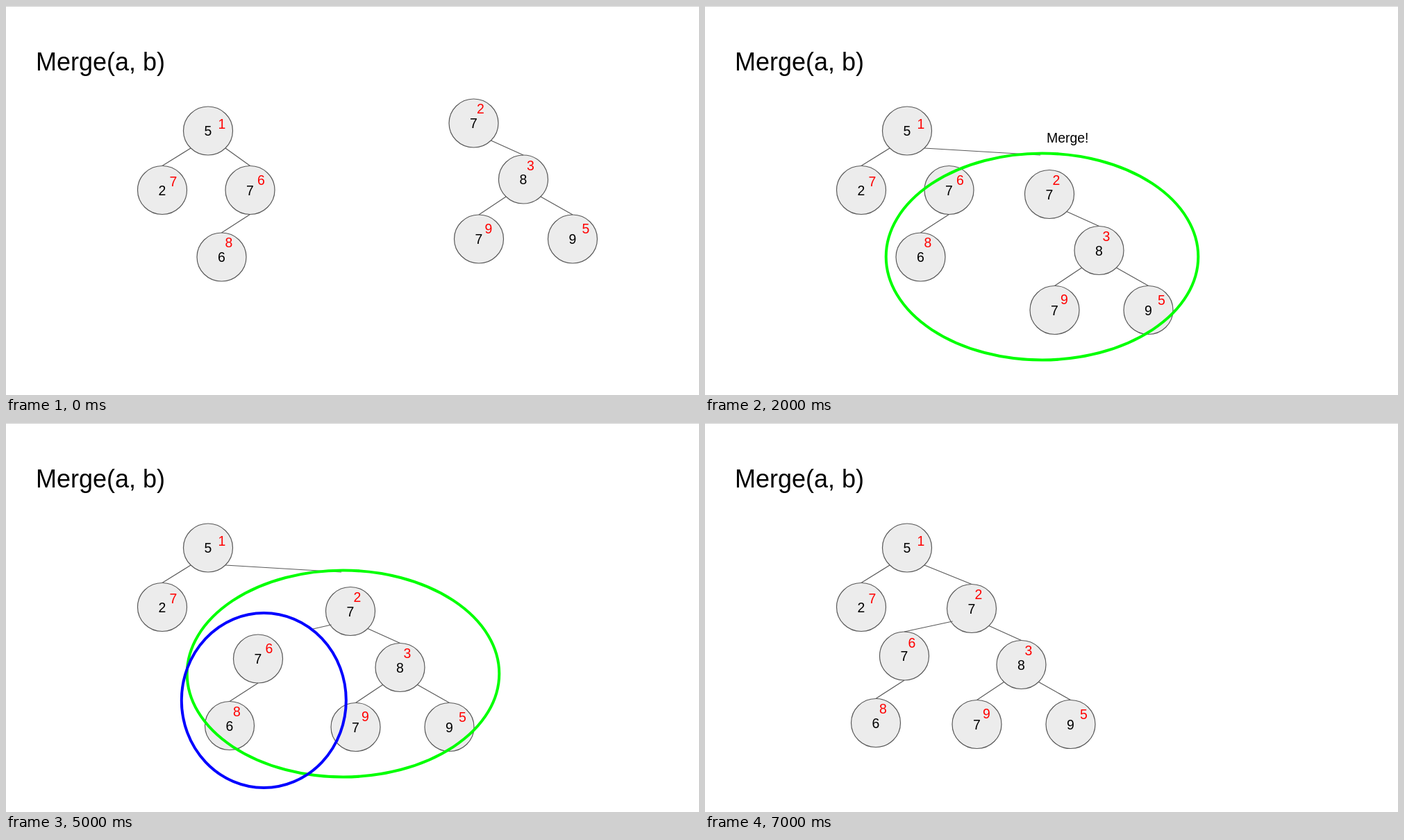
Animation of 998x561 px, one loop 8000 ms. Source, as an HTML page:

```html
<!DOCTYPE html>
<html lang="zh-Hant">
<head>
<meta charset="utf-8">
<title>Merge(a, b)</title>
<style>
html, body { margin: 0; width: 100%; height: 100%; overflow: hidden; background: #fff; }
svg { display: block; width: 100vw; height: 100vh; }
text { font: 19.4px "Liberation Sans", "Noto Sans CJK TC", "Noto Sans CJK", sans-serif; }
.title { font-size: 36px; }
.mid { text-anchor: middle; }
.rank { fill: #f00; }
.node { fill: #ececec; stroke: #595959; stroke-width: 1.2; }
.link { stroke: #595959; stroke-width: 1.2; }
.ring { fill: none; stroke-width: 4; }
</style>
</head>
<body>
<svg viewBox="0 0 998 561">
  <rect width="998" height="1" fill="#d4d4d4"/>
  <text class="title" x="43" y="93">Merge(a, b)</text>
  <g id="scene"></g>
</svg>
<script>
const STEP = 1000;
const RX = 35.5, RY = 35;

const label = (x, y, text, cls = "") => `<text class="${cls}" x="${x}" y="${y}">${text}</text>`;
const link = (x1, y1, x2, y2) => `<line class="link" x1="${x1}" y1="${y1}" x2="${x2}" y2="${y2}"/>`;
const ring = (x, y, rx, ry, color) =>
  `<ellipse class="ring" cx="${x}" cy="${y}" rx="${rx}" ry="${ry}" stroke="${color}"/>`;

// dx, dy: offset of the red priority from the node's centre
const node = (x, y, key, rank, dx, dy) =>
  `<ellipse class="node" cx="${x}" cy="${y}" rx="${RX}" ry="${RY}"/>` +
  label(x, y + 7, key, "mid") + label(x + dx, y + dy + 7, rank, "mid rank");

// link from a node's lower left (-1) or lower right (1) to the top of a child
const branch = (x, y, side, cx, cy) => link(x + side * 25, y + 25, cx, cy - RY);

const root = () =>
  node(291, 180, 5, 1, 20, -10) + node(225, 265.5, 2, 7, 16, -12.5) +
  branch(291, 180, -1, 225, 265.5);

const leftPart = (x, y) =>
  node(x, y, 7, 6, 16 - (x > 390 || x < 300 ? 5 : 0), y > 300 ? -19 + (x < 390 && x > 300 ? 4 : 0) : -15) +
  node(x - 41, y + 96.5, 6, 8, 10.5, -21) +
  link(x, y + RY, x - 41, y + 96.5 - RY);

const rightPart = (x, y) =>
  node(x, y, 7, 2, 10, -21) + node(x + 71.5, y + 81, 8, 3, 10.5, -20.5) +
  node(x + 7.5, y + 167, 7, 9, 14, -15.5) + node(x + 142.5, y + 167, 9, 5, 19, -15) +
  branch(x, y, 1, x + 71.5, y + 81) +
  branch(x + 71.5, y + 81, -1, x + 7.5, y + 167) +
  branch(x + 71.5, y + 81, 1, x + 142.5, y + 167);

const green = () => ring(485.5, 361.5, 224.8, 149, "#0f0");
const blue = () => ring(371.3, 400, 118.5, 126, "#00f");
const longLink = link(316, 205, 483, 215);

const apart = root() + leftPart(351.5, 265.5) + branch(291, 180, 1, 351.5, 265.5) +
  rightPart(673.5, 169);
const outer = root() + longLink + leftPart(351.5, 265.5) + rightPart(496, 271.5) + green();
const inner = root() + longLink + leftPart(363, 340) + rightPart(496, 271.5) +
  link(468.5, 291, 442, 297) + green() + blue();
const joined = root() + longLink + leftPart(399.5, 340) + rightPart(496, 271.5) +
  link(468.5, 290, 399.5, 305) + green();
const merged = root() + branch(291, 180, 1, 384, 267.5) + leftPart(287, 336) +
  rightPart(384, 267.5) + link(356.5, 286, 287, 301);

const steps = [
  apart,
  apart + label(372, 176, "左邊根節點的 priority 比較小"),
  outer + label(492, 197, "Merge!"),
  outer + label(506, 187, "右邊根節點的 priority", "mid") + label(506, 212, "比較小", "mid"),
  inner + label(174, 425, "Merge!"),
  inner,
  joined,
  merged
];

const scene = document.getElementById("scene");
let shown = -1;

function draw() {
  const step = Math.floor(performance.now() / STEP) % steps.length;
  if (step !== shown) {
    scene.innerHTML = steps[step];
    shown = step;
  }
  requestAnimationFrame(draw);
}
draw();
</script>
</body>
</html>
```
